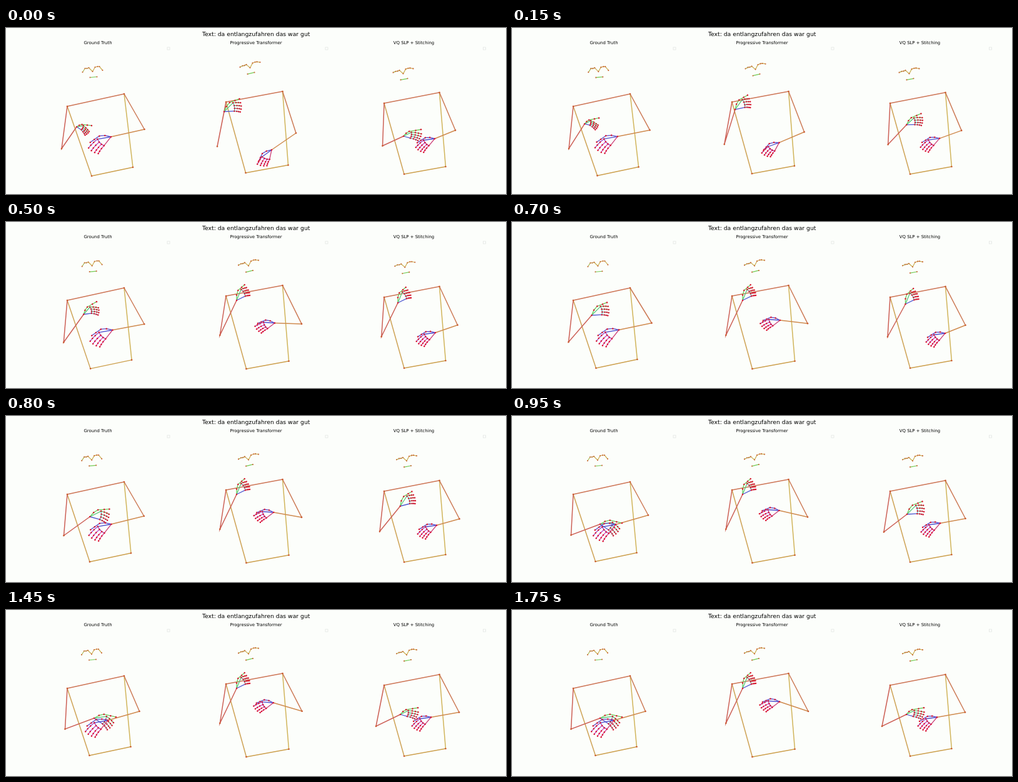
Animation of 800x267 px, one loop 1.8 s. Source, as an HTML page with a canvas:

```html
<!DOCTYPE html>
<html lang="de">
<head>
<meta charset="utf-8">
<title>Sign pose comparison</title>
<style>
  html, body { margin: 0; width: 100%; height: 100%; overflow: hidden; background: #fcfefb; }
  canvas { display: block; width: 800px; height: 267px; }
</style>
</head>
<body>
<canvas id="stage"></canvas>
<script>
const LOOP = 1800, STEPS = 29;

const clamp = v => Math.min(1, Math.max(0, v));
const lerp = (a, b, k) => a + (b - a) * k;
const mix = (a, b, k) => a.map((v, i) => lerp(v, b[i], k));
const add = (a, b) => [a[0] + b[0], a[1] + b[1]];
const polar = (origin, degrees, length) => {
  const angle = degrees * Math.PI / 180;
  return add(origin, [length * Math.cos(angle), length * Math.sin(angle)]);
};

// A grip: direction of the index knuckle, direction of the fingers, palm and finger length.
const dangling = [-10, 46, 11, 13];
const curled   = [-54, 10, 11, 15];
const arched   = [-45, 0, 20, 12];
const bowed    = [-26, 9, 14, 16];
const raised   = [-68, -18, 19, 9];
const reaching = [-8, 42, 20, 15];
const flat     = [170, 135, 22, 20];
const tucked   = [172, 137, 18, 17];
const drooping = [144, 122, 19, 14];
const sideways = [184, 154, 18, 15];

const pose = (step, elbow, wrist, grip) => ({ step, elbow, wrist, grip });

// settle: the steps over which hips (sag) and head (nod) shift.
const panels = [
  {
    title: "Ground Truth", x: 147, settle: [0, 15],
    shoulders: [[98, 126], [189, 106]], hips: [[137, 238], [203, 224]], sag: [-3.5, -4],
    nose: [138.5, 70], nod: [-1.5, 1], tilt: 0, droop: 6,
    left: [
      pose(0, [89, 194], [113, 159], dangling),
      pose(5, [94, 194], [121, 147], curled),
      pose(11, [90.5, 193], [127.5, 150], arched),
      pose(15, [94.5, 191.5], [141, 174], reaching)
    ],
    right: [
      pose(0, [221.5, 163], [168, 175], flat),
      pose(5, [219, 166], [170, 174], flat),
      pose(11, [223.5, 162.5], [171, 173.5], flat),
      pose(15, [218, 159.5], [166, 174.5], flat),
      pose(19, [213.5, 163], [163, 177.5], flat)
    ]
  },
  {
    title: "Progressive Transformer", x: 400, settle: [0, 5],
    shoulders: [[352, 119], [442.5, 102]], hips: [[383.5, 233], [451.5, 220.5]], sag: [1, 3.3],
    nose: [390.5, 64], nod: [-2.5, 6.5], tilt: -0.15, droop: 1.5,
    left: [
      pose(0, [338, 190.5], [349, 134.5], arched),
      pose(5, [342.3, 182], [369, 126], raised)
    ],
    right: [
      pose(0, [464, 169], [425, 196], drooping),
      pose(5, [473, 164.5], [431, 167], sideways),
      pose(15, [473, 162.5], [427.5, 152], sideways),
      pose(28, [474, 163], [428, 147.5], sideways)
    ]
  },
  {
    title: "VQ SLP + Stitching", x: 652.5, settle: [5, 11],
    shoulders: [[605, 121], [693.5, 103.8]], hips: [[637, 235], [703.4, 223]], sag: [0, 0],
    nose: [635.5, 73.5], nod: [5.5, -1.3], tilt: -0.1, droop: 1.5,
    left: [
      pose(0, [602.5, 189.5], [636, 174], bowed),
      pose(5, [600.5, 184], [624.5, 128], raised),
      pose(11, [601, 184.5], [629.5, 132], raised),
      pose(15, [595, 186.5], [632, 158], arched),
      pose(19, [592, 187], [631, 168], bowed)
    ],
    right: [
      pose(0, [719, 164.5], [686, 178], tucked),
      pose(5, [719.5, 165.5], [681, 177], tucked),
      pose(11, [725.5, 166], [693, 179], tucked),
      pose(15, [725.5, 165], [685, 172.5], tucked),
      pose(19, [725, 164.5], [680, 172.5], tucked)
    ]
  }
];

const canvas = document.getElementById("stage");
const ctx = canvas.getContext("2d");
const ratio = window.devicePixelRatio || 1;
canvas.width = Math.round(800 * ratio);
canvas.height = Math.round(267 * ratio);
ctx.scale(ratio, ratio);
ctx.lineCap = "round";
ctx.textAlign = "center";

function armAt(poses, step) {
  const next = poses.find(p => p.step > step);
  if (!next) return poses[poses.length - 1];
  const last = poses[poses.indexOf(next) - 1];
  const k = (step - last.step) / (next.step - last.step);
  const between = key => mix(last[key], next[key], k);
  return { elbow: between("elbow"), wrist: between("wrist"), grip: between("grip") };
}

function line(points, color) {
  ctx.strokeStyle = color;
  ctx.beginPath();
  points.forEach(p => ctx.lineTo(...p));
  ctx.stroke();
}

function dots(points, color, radius) {
  ctx.fillStyle = color;
  for (const [x, y] of points) {
    ctx.beginPath();
    ctx.arc(x, y, radius, 0, 7);
    ctx.fill();
  }
}

function drawHand({ wrist, grip: [turn, aim, palm, reach] }, isLeft) {
  const side = isLeft ? 1 : -1;
  const thumbMid = polar(wrist, turn - side * 14, palm * 0.85);
  const thumbTip = polar(wrist, turn + side * 5, (palm + reach) * (isLeft ? 1 : 0.82));
  const thumb = [
    polar(wrist, turn - side * 22, palm * 0.45), thumbMid,
    mix(thumbMid, thumbTip, 0.55), thumbTip
  ];
  const joints = [wrist, ...thumb];
  const knuckles = [];

  ctx.lineWidth = 1.3;
  line([wrist, ...thumb], isLeft ? "#6cca58" : "#5b4cc8");
  for (let i = 0; i < 4; i++) {
    const knuckle = polar(wrist, turn + side * 14 * i, palm * (1 - 0.06 * i));
    const finger = [0, 0.4, 0.72, 1].map(k =>
      polar(knuckle, aim + side * (i * 3 + k * 8 - 8), k * reach * (1 - 0.07 * i)));
    line(finger, isLeft ? `hsl(${130 + i * 19} 50% 56%)` : `hsl(${278 + i * 14} 58% 55%)`);
    knuckles.push(knuckle);
    joints.push(...finger);
  }
  line([wrist, knuckles[0]], isLeft ? "#58c87a" : "#4c4ccf");
  line([wrist, knuckles[3]], isLeft ? "#4e58cf" : "#cc4078");
  line(knuckles, isLeft ? "#5abcc0" : "#9a44c8");
  dots(joints, "#dc1830", 1.25);
}

// Two arcs of brow points meet at the nose; droop lowers their outer ends.
function drawFace([x, y], tilt, droop) {
  const place = ([dx, dy]) => [x + dx, y + dy + dx * tilt];
  const brow = [
    [-16, -5 + droop], [-12, -5], [-9, -5], [-6, -6], [0, 0],
    [4, -7], [8, -8], [11, -8], [16, -8 + droop]
  ].map(place);
  const mouth = [[-4, 9.5], [7, 8.5]].map(place);
  ctx.lineWidth = 1.2;
  line(brow.slice(3), "#c9ae50");
  line(brow.slice(0, 4), "#a8b650");
  line(mouth, "#72cb52");
  dots([...brow, ...mouth], "#cd6a3a", 1.05);
}

function drawPanel(panel, step) {
  const [from, to] = panel.settle;
  const settled = clamp((step - from) / (to - from));
  const moved = (point, shift) => add(point, shift.map(v => v * settled));
  const [leftShoulder, rightShoulder] = panel.shoulders;
  const [leftHip, rightHip] = panel.hips.map(hip => moved(hip, panel.sag));
  const left = armAt(panel.left, step);
  const right = armAt(panel.right, step);

  ctx.lineWidth = 1.5;
  line([leftShoulder, leftHip], "#cea356");
  line([rightShoulder, rightHip], "#d0b45a");
  line([leftHip, rightHip], "#cc9f4c");
  line([leftShoulder, rightShoulder], "#cd7455");
  line([leftShoulder, left.elbow, left.wrist], "#cc5f55");
  line([rightShoulder, right.elbow], "#cc7a55");
  line([right.elbow, right.wrist], "#cf8a4e");
  dots([...panel.shoulders, left.elbow, right.elbow, leftHip, rightHip], "#cb5a30", 1.3);

  drawFace(moved(panel.nose, panel.nod), panel.tilt, panel.droop);
  drawHand(left, true);
  drawHand(right, false);
}

function label(text, x, y, size) {
  ctx.fillStyle = "#000";
  ctx.font = `${size}px "DejaVu Sans", sans-serif`;
  ctx.fillText(text, x, y);
}

function draw(time) {
  const step = Math.floor(time % LOOP / LOOP * STEPS + 0.25);
  ctx.fillStyle = "#fcfefb";
  ctx.fillRect(0, 0, 800, 267);
  label("Text: da entlangzufahren das war gut", 400.2, 12.6, 9.24);
  for (const panel of panels) {
    label(panel.title, panel.x, 25.7, 6.9);
    ctx.strokeStyle = "#dfe2df";
    ctx.lineWidth = 0.7;
    ctx.strokeRect(panel.x + 111, 31, 4, 4);
    drawPanel(panel, step % STEPS);
  }
}

const start = performance.now();
function tick() {
  draw(performance.now() - start);
  requestAnimationFrame(tick);
}
tick();
</script>
</body>
</html>
```
